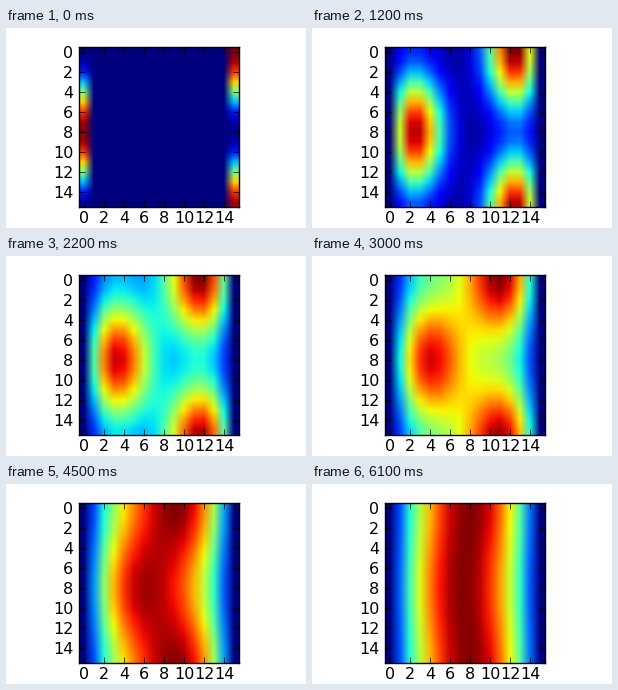
Animation of 300x200 px, one loop 6.2 s. Source, as a matplotlib script:

```python
import numpy as np
import matplotlib as mpl
import matplotlib.pyplot as plt
from matplotlib.animation import FuncAnimation

WIDTH, HEIGHT = 300, 200
SIZE = 16
FRAMES = 62
INTERVAL = 100

mpl.rcParams.update({
    "font.family": "DejaVu Sans",
    "font.size": 11.5,
    "axes.linewidth": 1.0,
})


def initial_state():
    """Empty grid with sin^2 on the left edge and cos^2 on the right."""
    phase = np.pi * np.arange(SIZE + 1) / SIZE
    grid = np.zeros((SIZE + 1, SIZE))
    grid[:, 0] = np.sin(phase) ** 2
    grid[:, -1] = np.cos(phase) ** 2
    return grid


def diffuse(grid):
    """Average the four neighbours: no flux in y, zero at both x edges."""
    padded = np.pad(grid, ((1, 1), (0, 0)), mode="edge")
    vertical = padded[:-2] + padded[2:]
    result = np.zeros_like(grid)
    result[:, 1:-1] = (vertical[:, 1:-1] + grid[:, :-2] + grid[:, 2:]) / 4
    return result


def simulate(count):
    states = [initial_state()]
    while len(states) < count:
        states.append(diffuse(states[-1]))
    return states


def colorize(grid):
    # Colours, not values, get interpolated, so map them to RGBA first.
    # The last row lies outside the plotted square.
    return mpl.colormaps["jet"](grid[:SIZE] / grid.max())


states = simulate(FRAMES)

fig = plt.figure(figsize=(WIDTH / 100, HEIGHT / 100), dpi=100,
                 facecolor="white")
ax = fig.add_axes([73 / WIDTH, 21 / HEIGHT, 160 / WIDTH, 160 / HEIGHT])
image = ax.imshow(colorize(states[0]), interpolation="bilinear")

ticks = range(0, SIZE, 2)
ax.set_xticks(ticks)
ax.set_yticks(ticks)
ax.tick_params(direction="in", length=4, width=0.5, pad=4,
               top=True, right=True)
ax.tick_params(axis="x", pad=3.2)
ax.set_axisbelow(False)


def update(frame):
    image.set_data(colorize(states[frame]))
    return [image]


anim = FuncAnimation(fig, update, frames=FRAMES, interval=INTERVAL,
                     repeat=True, repeat_delay=0)
plt.show()
```
